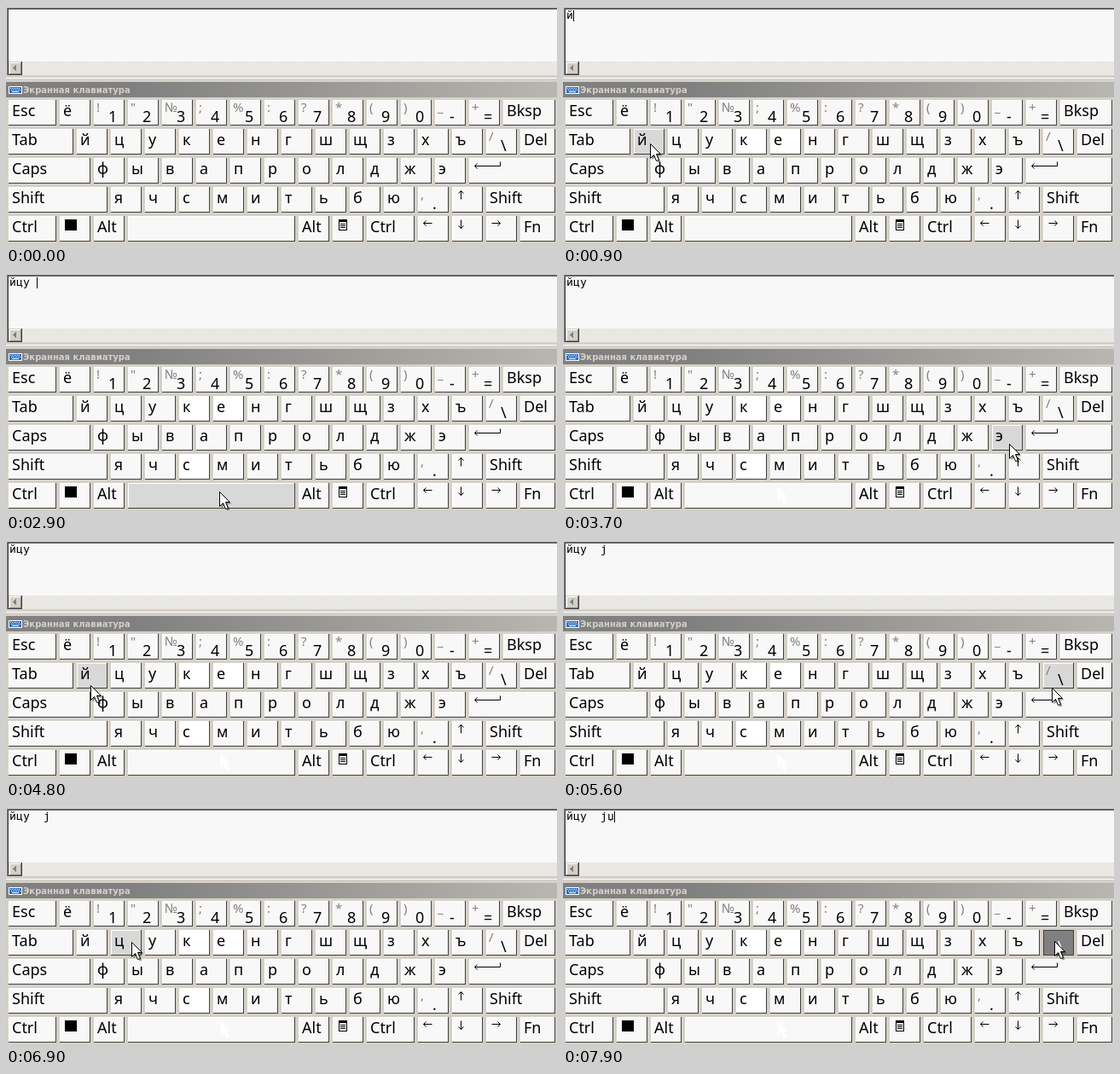
An HTML page with a canvas for the animation above (8 s loop, 646 by 280 pixels).

```html
<!DOCTYPE html>
<html lang="ru">
<head>
<meta charset="utf-8">
<title>Экранная клавиатура</title>
<style>
  html, body { margin: 0; width: 100%; height: 100%; overflow: hidden; background: #d4d0c8; }
  canvas { display: block; width: 646px; height: 280px; }
</style>
</head>
<body>
<canvas id="stage" width="646" height="280"></canvas>
<script>
const ctx = document.getElementById('stage').getContext('2d');
const LOOP = 8000, STEP = 100, BLINK = 500, HOLD = 200, TRAVEL = 600;
const FACE = '#f8f8f8', PANEL = '#d4d0c8', SANS = '"Noto Sans", sans-serif';

// "a|b" holds a small and a main sign, "#name" an icon.
const CELL = 40, GAP = 4, LEFT = 3, RIGHT = 644;
const spans = { Esc: 1.5, Tab: 2, Caps: 2.5, Shift: 3, Ctrl: 1.5, '#space': 5 };
const keys = [
  'Esc ё !|1 "|2 №|3 ;|4 %|5 :|6 ?|7 *|8 (|9 )|0 _|- +|= Bksp',
  'Tab й ц у к е н г ш щ з х ъ /|\\ Del',
  'Caps ф ы в а п р о л д ж э #enter',
  'Shift я ч с м и т ь б ю ,|. #up Shift',
  'Ctrl #square Alt #space Alt #menu Ctrl #left #down #right Fn'
].flatMap((row, r) => {
  let x = LEFT;
  return row.split(' ').map((label, i, labels) => {
    const isLast = i === labels.length - 1;
    const w = isLast ? RIGHT - x : (spans[label] || 1) * CELL - GAP;
    const key = { label, x, y: 110 + 34 * r, w, h: 30 };
    x += w + GAP;
    return key;
  });
});

// Clicks: press time, pointer tip, typed text
const entry = { press: 100 - HOLD, x: 439, y: 113 };
const clicks = [
  [700, 102, 161, 'й'], [1400, 140, 168, 'ц'], [2000, 177, 168, 'у'],
  [2700, 250, 256, ' '], [3000, 250, 256, ' '], [4300, 576, 165, ''],
  [5000, 99, 170, 'ј'], [6000, 576, 165, ''], [7000, 147, 158, 'џ'], [7800, 576, 157, '']
].map(([press, x, y, typed]) => ({ press, x, y, typed }));

// Keys that turn whiter once the pointer has passed
const bleached = { к: 500, е: 500, с: 2400 };

function rect(x, y, w, h, color) {
  ctx.fillStyle = color;
  ctx.fillRect(x, y, w, h);
}
function text(str, x, y, font, color) {
  ctx.font = font;
  ctx.fillStyle = color;
  ctx.fillText(str, x, y);
}
function line(color, ...points) {
  ctx.strokeStyle = color;
  ctx.lineWidth = 1;
  ctx.beginPath();
  points.forEach(([x, y]) => ctx.lineTo(x + 0.5, y + 0.5));
  ctx.stroke();
}
function bevel(x, y, w, h, light, dark, face) {
  rect(x, y, w, h, dark);
  rect(x, y, w - 1, h - 1, light);
  rect(x + 1, y + 1, w - 2, h - 2, face);
}

function arrow(cx, cy, angle) {
  ctx.save();
  ctx.translate(cx + 0.5, cy + 0.5);
  ctx.rotate(angle);
  ctx.translate(-0.5, -0.5);
  line('#000', [-5, 0], [5, 0]);
  line('#000', [2, -3], [5, 0], [2, 3]);
  ctx.restore();
}

const icons = {
  space() {},
  square: (x, y) => rect(x + 6, y + 4, 14, 13, '#000'),
  menu(x, y) {
    ctx.strokeStyle = '#000';
    ctx.strokeRect(x + 7.5, y + 4.5, 9, 12);
    rect(x + 7, y + 4, 10, 3, '#000');
    for (let dy = 9; dy < 15; dy += 2) rect(x + 9, y + dy, 6, 1, '#000');
  },
  enter(x, y) {
    line('#000', [x + 36, y + 4], [x + 36, y + 9], [x + 6, y + 9]);
    line('#000', [x + 9, y + 6], [x + 6, y + 9], [x + 9, y + 12]);
  },
  up: (x, y) => arrow(x + 10, y + 9, -Math.PI / 2),
  down: (x, y) => arrow(x + 10, y + 9, Math.PI / 2),
  left: (x, y) => arrow(x + 11, y + 8, Math.PI),
  right: (x, y) => arrow(x + 11, y + 8, 0)
};

function drawKey({ label, x, y, w, h }, face, pressed) {
  bevel(x, y, w, h, pressed ? '#404040' : '#fff', '#404040', face);
  const ink = pressed ? '#fff' : '#000';
  if (label[0] === '#') icons[label.slice(1)](x, y);
  else if (label.includes('|')) {
    const [small, main] = label.split('|');
    text(small, x + 3, y + 14, '15px ' + SANS, '#808080');
    text(main, x + 17, y + 26, '500 18px ' + SANS, ink);
  } else text(label, x + 4, y + 19, '500 18px ' + SANS, ink);
}

function pointerShape(x, y, fill) {
  ctx.beginPath();
  [[0, 0], [0, 17], [4, 13], [7, 20], [10, 19], [7, 12], [12, 12]]
    .forEach(([dx, dy]) => ctx.lineTo(x + dx + 0.5, y + dy + 0.5));
  ctx.closePath();
  ctx.fillStyle = fill;
  ctx.fill();
}
function drawPointer(x, y) {
  pointerShape(x + 2, y + 2, 'rgba(0,0,0,.4)');
  pointerShape(x, y, '#fff');
  ctx.strokeStyle = '#000';
  ctx.lineWidth = 1;
  ctx.stroke();
}

const tile = document.createElement('canvas');
tile.width = tile.height = 2;
const tileCtx = tile.getContext('2d');
tileCtx.fillStyle = '#fff';
tileCtx.fillRect(0, 0, 2, 2);
tileCtx.fillStyle = PANEL;
tileCtx.fillRect(0, 0, 1, 1);
tileCtx.fillRect(1, 1, 1, 1);
const checker = ctx.createPattern(tile, 'repeat');

const titleShade = ctx.createLinearGradient(150, 0, 646, 0);
titleShade.addColorStop(0, '#808080');
titleShade.addColorStop(1, '#b8b6b0');

function drawWindows() {
  rect(0, 0, 646, 280, PANEL);
  rect(1, 2, 645, 79, '#808080');
  rect(2, 3, 644, 78, '#404040');
  rect(3, 4, 643, 77, FACE);
  rect(3, 65, 643, 16, checker);
  bevel(3, 65, 16, 16, PANEL, '#404040', '#808080');
  bevel(4, 66, 14, 14, '#fff', '#808080', PANEL);
  for (let i = 0; i < 4; i++) rect(8 + i, 72 - i, 1, 1 + 2 * i, '#808080');
  rect(0, 84, 646, 1, '#fff');

  rect(0, 89, 646, 18, titleShade);
  rect(3, 94, 16, 9, '#fff');
  rect(4, 95, 14, 7, '#2a6fc0');
  for (let i = 0; i < 12; i++) rect(5 + i, 96 + 2 * (i % 2), 1, 1, '#fff');
  rect(7, 100, 8, 1, '#fff');
  text('Экранная клавиатура', 20, 102, 'bold 10px "DejaVu Sans", sans-serif', PANEL);
}

const easeOut = (u, power) => 1 - (1 - u) ** power;

// The pointer darts to each key, settling sideways sooner than vertically.
function pointerAt(t) {
  const i = clicks.findIndex(c => c.press + HOLD > t);
  const from = clicks[i - 1] || entry, to = clicks[i];
  const arrive = to.press - HOLD;
  const leave = Math.max(from.press + HOLD, arrive - TRAVEL);
  const u = Math.min(1, Math.max(0, (t - leave) / (arrive - leave)));
  const x = from.x + (to.x - from.x) * easeOut(u, 4.5);
  const y = from.y + (to.y - from.y) * easeOut(u, 3) + 9 * Math.sin(Math.PI * u);
  return [Math.round(x), Math.round(y)];
}

function draw(t) {
  const active = t >= 100;
  const [px, py] = active ? pointerAt(t) : [-1, -1];
  const past = clicks.filter(c => c.press <= t);
  const last = past[past.length - 1];
  const pressing = last && t < last.press + HOLD;

  drawWindows();
  for (const key of keys) {
    const hover = px >= key.x && px < key.x + key.w && py >= key.y && py < key.y + key.h;
    const pressed = hover && pressing;
    const rest = t >= bleached[key.label] ? '#fff' : FACE;
    drawKey(key, pressed ? '#808080' : hover ? '#d8d8d8' : rest, pressed);
  }
  if (t >= 3500) pointerShape(251, 250, '#fff');

  const typed = past.map(c => c.typed).join('');
  [...typed].forEach((ch, i) => text(ch, 4 + 8 * i, 15, '13px "DejaVu Sans Mono", monospace', '#000'));
  const since = t - (last ? last.press : 100);
  if (active && since % (2 * BLINK) < BLINK) rect(4 + 8 * typed.length, 5, 1, 13, '#000');
  if (active) drawPointer(px, py);
}

const start = performance.now();
function tick() {
  const t = (performance.now() - start) % LOOP;
  draw(Math.floor(t / STEP) * STEP);
  requestAnimationFrame(tick);
}
tick();
</script>
</body>
</html>
```
